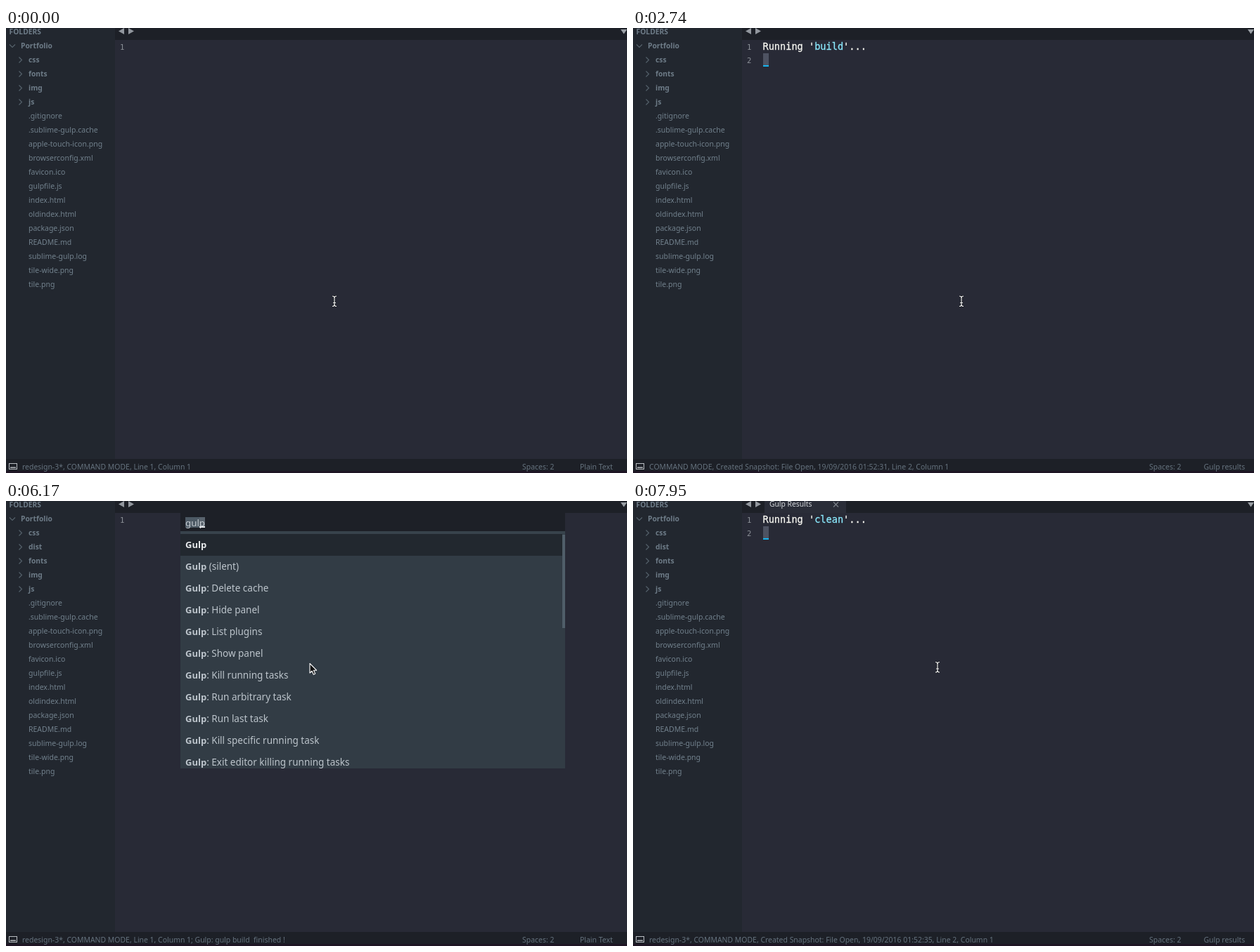
An HTML page for the animation above (8000 ms loop, 883 by 634 pixels).

```html
<!DOCTYPE html>
<html lang="en">
<head>
<meta charset="utf-8">
<title>Running Gulp tasks in the editor</title>
<style>
html, body { margin: 0; width: 100%; height: 100%; overflow: hidden; background: #282a36; }
svg { display: block; width: 883px; height: 634px; }
text { white-space: pre; font-family: "Noto Sans", "Open Sans", sans-serif; }
.side { font-size: 10.5px; fill: #71808c; }
.dir { font-size: 10.3px; font-weight: bold; fill: #6d7b87; }
.bar { font-size: 10.45px; fill: #65727e; }
.tab { font-size: 10.3px; fill: #d3d6da; }
.code { font: 13.6px "DejaVu Sans Mono", monospace; color: #f8f8f2; }
.code, .code tspan { fill: currentColor; stroke: currentColor; stroke-width: .3px; }
.num { font: 10.6px "DejaVu Sans Mono", monospace; fill: #8b9097; text-anchor: end; }
.cmd { font-size: 13.5px; fill: #bcc4cb; }
.cmd .hit { font-weight: bold; font-size: 13px; }
.task { font: 12px "DejaVu Sans Mono", monospace; fill: #b3bbc2; }
.task .hit { font-weight: bold; }
.sel { fill: #e6e9eb; }
.query { font-size: 13.3px; fill: #c3cad0; }
</style>
</head>
<body>
<svg id="stage" viewBox="0 0 883 634" xmlns="http://www.w3.org/2000/svg"></svg>
<script>
const LOOP = 8000;
const stage = document.getElementById('stage');
const pen = document.createElement('canvas').getContext('2d');

// Each run: command palette, task list, then the results view
const runs = [
  { open: 650, pick: 1460, type: 1940, word: 'buil', start: 2740, done: 4100, end: 5300, task: 'build', clock: 31 },
  { open: 6170, pick: 6700, type: 7120, word: 'cle', start: 7620, done: LOOP, end: LOOP, task: 'clean', clock: 35, recall: true }
];

const folders = ['css', 'dist', 'fonts', 'img', 'js'];
const files = ['.gitignore', '.sublime-gulp.cache', 'apple-touch-icon.png', 'browserconfig.xml',
  'favicon.ico', 'gulpfile.js', 'index.html', 'oldindex.html', 'package.json', 'README.md',
  'sublime-gulp.log', 'tile-wide.png', 'tile.png'];
const commands = ['Gulp', 'Gulp (silent)', ...['Delete cache', 'Hide panel', 'List plugins',
  'Show panel', 'Kill running tasks', 'Run arbitrary task', 'Run last task',
  'Kill specific running task', 'Exit editor killing running tasks'].map(s => 'Gulp: ' + s)];
const tasks = ['build', 'clean', 'default', 'fonts', 'headerScripts', 'images', 'modernizr',
  'scripts', 'styles', 'watch'];
const begin = task => `Starting '${task}'...`;
const finish = (task, time) => `Finished '${task}' after ${time}`;
const log = ['Using gulpfile ~/Dropbox/Aplicaciones/Pancake.io/Portfolio/gulpfile.js',
  begin('clean'), finish('clean', '11 ms'), begin('scripts'), begin('headerScripts'),
  begin('images'), finish('images', '30 µs'), begin('styles'), finish('styles', '13 ms'),
  begin('fonts'), finish('headerScripts', '76 ms'), finish('scripts', '332 ms'),
  finish('fonts', '293 ms'), begin('build'), finish('build', '3.12 µs')]
  .map((s, i) => `[01:52:${i < 10 ? 31 : 32}] ${s}`);

const clamp = v => Math.max(0, Math.min(1, v));
const part = (t, from, span) => clamp((t - from) / span);
const mix = (a, b, p) => a + (b - a) * p;
// Number of keys pressed so far
const keys = (t, from, gap) => Math.max(0, Math.floor((t - from) / gap) + 1);

const rect = (x, y, w, h, fill, more = '') =>
  `<rect x="${x}" y="${y}" width="${w}" height="${h}" fill="${fill}" ${more}/>`;
const text = (x, y, cls, s) => `<text x="${x}" y="${y}" class="${cls}">${s}</text>`;
const path = (d, fill, more = '') => `<path d="${d}" fill="${fill}" ${more}/>`;
const tint = (color, s) => `<tspan color="${color}">${s}</tspan>`;

const paint = line => line
  .replace(/\d\d:\d\d:\d\d/, s => tint('#6272a4', s))
  .replace(/'(\w+)'/, (_, s) => `'${tint('#8be9fd', s)}'`)
  .replace(/(~\S+|[\d.]+ [mµ]s)$/, s => tint('#ff79c6', s));

function queryWidth(s) {
  pen.font = '13.3px "Noto Sans", "Open Sans", sans-serif';
  return pen.measureText(s).width;
}

// Fuzzy match: marked-up label, or null when the query does not fit
function match(label, query) {
  let out = '', run = '', q = 0;
  const flush = () => { if (run) out += `<tspan class="hit">${run}</tspan>`; run = ''; };
  for (const c of label) {
    if (q < query.length && c.toLowerCase() === query[q]) { run += c; q++; }
    else { flush(); out += c; }
  }
  flush();
  return q === query.length ? out : null;
}

function sidebar(t) {
  const gap = 20 * part(t, 3330, 350);
  const slide = 134 * (1 - part(t, 3680, 600) ** 4);
  const line = 'stroke="#57636d" stroke-width="1.1"';
  let s = rect(0, 0, 155, 614, '#22272f') + text(4.5, 9, 'dir', 'FOLDERS') +
    path('M5 23.5l4 4l4-4', 'none', line) + text(21, 29, 'dir', 'Portfolio');
  let y = 45;
  for (const name of folders) {
    const fresh = name === 'dist', x = fresh ? slide : 0;
    if (!fresh || gap === 20) {
      s += path(`M${x + 18.5} ${y - 3.5}l4 4l-4 4`, 'none', line) + text(x + 32, y + 4, 'dir', name);
    }
    y += fresh ? gap : 20;
  }
  files.forEach((name, i) => { s += text(32, y + 4 + i * 20, 'side', name); });
  return `<g clip-path="url(#sideClip)">${s}</g>`;
}

function tabBar(t, run) {
  const open = part(t, run.start + 110, 210) * (1 - part(t, run.end, 430));
  let s = rect(155, 0, 728, 17, '#1d2027') +
    path('M160 4.5l8-4.5v9zM182 4.5l-8-4.5v9z', '#92979e') + path('M874 2h9l-4.5 6.5z', '#9a9fa5');
  if (open) {
    s += `<g opacity="${open}">` + rect(187, 0, 116 * open, 17, '#2a2d38') +
      text(194, 8, 'tab', 'Gulp Results') +
      path('M285 1.5l7 7m0-7l-7 7', 'none', 'stroke="#7d838b" stroke-width="1.1"') + '</g>';
  }
  return s;
}

function output(t, run) {
  if (t < run.start || t >= run.end) return [];
  const n = Math.floor(log.length * part(t, run.done - 1000, 1000));
  return [`Running '${run.task}'...`, ...log.slice(0, run.done < LOOP ? n : 0)];
}

// The caret stays solid after an edit, then pulses
function caret(t, run) {
  if (t >= run.open && t < run.start) return 0;
  const edit = [-800, run.start, run.done, run.end].filter(e => e <= t).pop();
  const rest = Math.max(0, t - edit - 350);
  return clamp(.5 + 1.2 * Math.cos(rest / 900 * 2 * Math.PI));
}

function editor(t, run, lines) {
  const n = lines.length, row = i => Math.round(i * 19.13);
  let s = rect(155, 17, 728, 597, '#282a36');
  lines.forEach((l, i) => {
    s += text(168.5, 30.5 + row(i), 'num', n - i) + text(184.5, 31 + row(i), 'code', paint(l));
  });
  const y = 17 + row(n);
  return s + text(168.5, y + 13.5, 'num', n + 1) + `<g opacity="${caret(t, run)}">` +
    rect(185, y, 8, 19, '#4e5362') + rect(185, y + 17, 8, 2, '#16b4ee') + '</g>';
}

function openPanel(t, run) {
  if (t >= run.open && t < run.pick) {
    const query = run.recall ? 'gulp' : 'gulp'.slice(0, 2 * keys(t, run.open + 270, 150));
    return { x: 248, w: 547, list: commands, pitch: 31, cls: 'cmd', query,
      picked: run.recall, thumb: query === 'gulp' ? 133 : 40 };
  }
  if (t >= run.pick + 90 && t < run.start) {
    const query = run.word.slice(0, keys(t, run.type, 115));
    return { x: 339, w: 364, list: tasks, pitch: 52, cls: 'task', query, thumb: 214 };
  }
  return null;
}

function layout(p) {
  p.rows = p.list.map(l => match(l, p.query)).filter(Boolean);
  p.bottom = Math.min(381, 47 + p.rows.length * p.pitch);
  return p;
}

function panel({ x, w, rows, bottom, pitch, cls, query, thumb, picked }) {
  const full = bottom === 381;
  const left = x + 7, end = left + queryWidth(query);
  let s = rect(x, 17, w, 26, '#1d2027') + rect(x, 43, w, 4, '#38434c') +
    rect(x, 47, w, bottom - 47, '#323c45') + rect(x, 47, full ? w - 4 : w, pitch, '#22282f');
  rows.forEach((r, i) => { s += text(left, 66.7 + i * pitch, cls + (i ? '' : ' sel'), r); });
  if (full) s += rect(x + w - 4, 48, 4, thumb, '#505e69');
  const size = picked ? 8 : 4, cx = picked ? end - size : end;
  if (picked) s += rect(left, 23, end - left, 15, '#4c5964');
  s += rect(cx, 23, size, 15, '#59636d') + text(left, 35.5, 'query', query) +
    rect(cx, 36, size, 2, '#e2e5e8');
  return `<g clip-path="url(#listClip)">${s}</g>`;
}

function status(t, run, line) {
  const running = t >= run.start && t < run.end;
  const settling = (running && t < run.start + 110) || (t >= run.end && t < run.end + 430);
  const branch = settling ? '' : 'redesign-3*, ';
  const stamp = running ? `Created Snapshot: File Open, 19/09/2016 01:52:${run.clock}, ` : '';
  const built = t >= runs[0].done && t < runs[1].pick;
  const push = built && running ? 26.5 : 0;
  return rect(0, 614, 883, 17, '#1d2027') + rect(0, 631, 883, 3, '#1e1524') +
    rect(4.5, 620.5, 11, 8, 'none', 'stroke="#b9bdc2"') + rect(6, 625.5, 8, 1.5, '#b9bdc2') +
    text(23, 629, 'bar', `${branch}COMMAND MODE, ${stamp}Line ${line}, Column 1` +
      (built ? '; Gulp: gulp build  finished !' : '')) +
    text(734 + push, 629, 'bar', 'Spaces: 2') +
    text(running ? 811.5 + push : 816, 629, 'bar', running ? 'Gulp results' : 'Plain Text');
}

// Pointer stops: arrival time, travel time, place
const stops = [[0, 1, 467, 389], [3060, 320, 113, 300], [4100, 420, 242, 159], [4690, 500, 433, 236.5]];

function pointer(t, p) {
  let x = 0, y = 0;
  for (const [end, span, tx, ty] of stops) {
    const k = end ? part(t, end - span, span) : 1;
    x = mix(x, tx, k);
    y = mix(y, ty, k);
  }
  if (x < 155 || (p && x > p.x && x < p.x + p.w && y < p.bottom)) {
    return path(`M${x - 1} ${y - 5}v13.5l3-2.8l2.3 5l2.4-1.1l-2.3-4.9h4.2z`, '#111',
      'stroke="#fff" stroke-width="1.1" stroke-linejoin="round"');
  }
  const side = d => `M${x - 3 * d} ${y - 7}q${3 * d} 0 ${3 * d} 2.5v9.5q0 2.5 ${-3 * d} 2.5`;
  const beam = side(1) + side(-1) + `M${x - 2} ${y + 2.5}h4`;
  return path(beam, 'none', 'stroke="#15171c" stroke-width="2.6"') +
    path(beam, 'none', 'stroke="#f4f4f4" stroke-width="1.2"');
}

const defs = `<defs><clipPath id="sideClip">${rect(0, 0, 155, 614, '#000')}</clipPath>` +
  `<clipPath id="listClip">${rect(0, 17, 883, 364, '#000')}</clipPath></defs>`;

let shown = '';
function draw(t) {
  const run = t < runs[1].open ? runs[0] : runs[1];
  const lines = output(t, run), found = openPanel(t, run), p = found && layout(found);
  const view = defs + editor(t, run, lines) + sidebar(t) + tabBar(t, run) +
    (p ? panel(p) : '') + status(t, run, lines.length + 1) + pointer(t, p);
  if (view !== shown) stage.innerHTML = shown = view;
}

let origin = null;
function frame(now) {
  if (origin === null) origin = now;
  draw((now - origin) % LOOP);
  requestAnimationFrame(frame);
}
draw(0);
requestAnimationFrame(frame);
</script>
</body>
</html>
```
